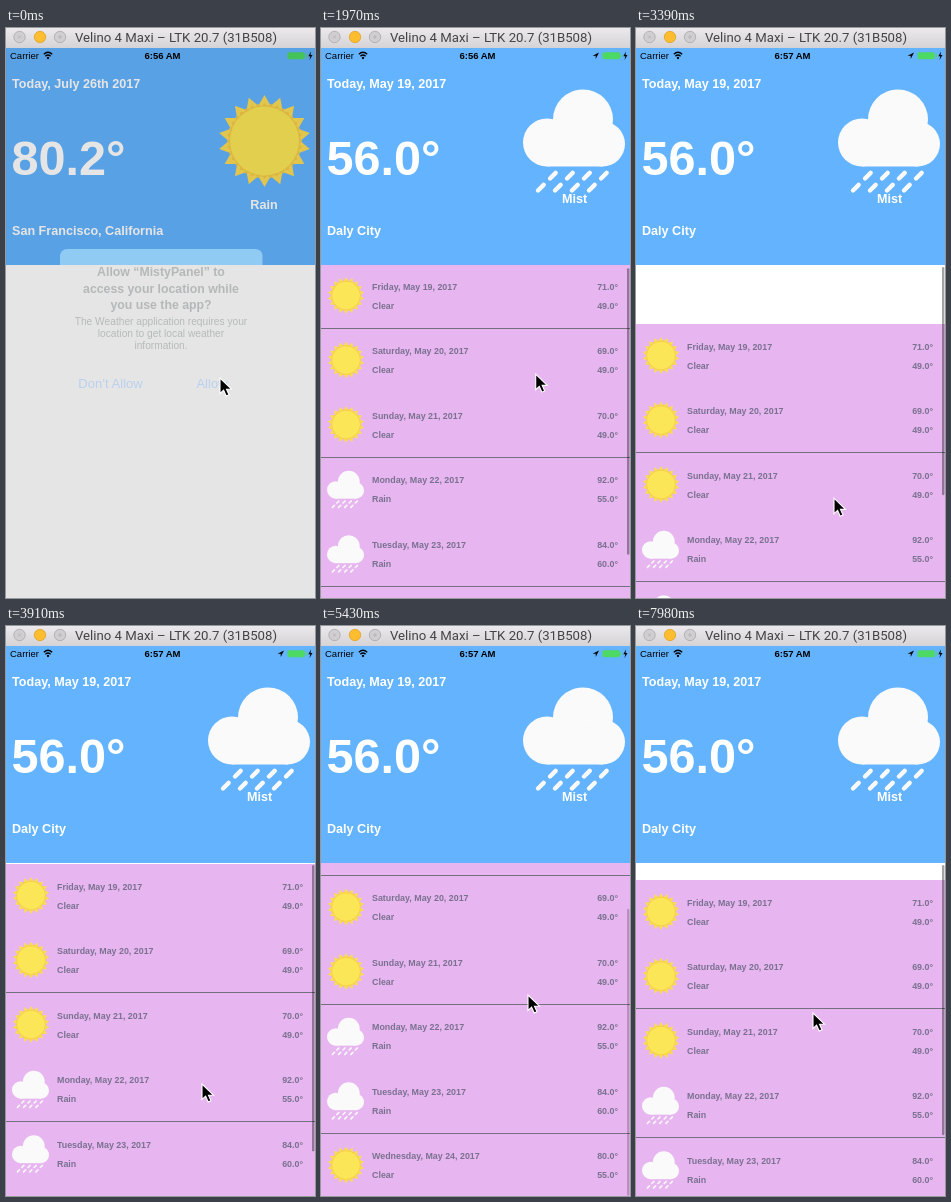
An HTML page that plays this animation: 309x570 px, repeating every 8000 ms.

```html
<!DOCTYPE html>
<html lang="en">
<head>
<meta charset="utf-8">
<title>Weather forecast</title>
<style>
  html, body { margin: 0; width: 100%; height: 100%; overflow: hidden; background: #fff; }
  svg { display: block; }
  text { font-family: "Liberation Sans", Arial, sans-serif; white-space: pre; }
  .title { font: 13.2px Roboto, sans-serif; fill: #454345; }
  .status { font-size: 9.5px; fill: #000; }
  .bold, .head, .big, .row { font-weight: bold; }
  .head { font-size: 12.6px; fill: #fff; }
  .big { font-size: 48.6px; fill: #fff; }
  .row { font-size: 8.9px; fill: #7a7190; }
  .mid { text-anchor: middle; }
  .end { text-anchor: end; }
  .ask { font-size: 12.3px; font-weight: bold; fill: #b4b8b8; }
  .info { font-size: 10.2px; fill: #b6baba; }
  .btn { font-size: 13px; fill: #b9d0ee; }
</style>
</head>
<body>
<svg id="stage" width="309" height="570" viewBox="0 0 309 570">
  <defs>
    <linearGradient id="bar" x2="0" y2="1">
      <stop offset="0" stop-color="#ebe9eb"/>
      <stop offset="1" stop-color="#d5d3d5"/>
    </linearGradient>
    <clipPath id="table"><rect y="237" width="309" height="333"/></clipPath>
    <g id="sun"></g>
    <g id="cloud" fill="#fafafa">
      <circle cx="24" cy="53" r="24"/>
      <circle cx="60" cy="30" r="30"/>
      <circle cx="79.5" cy="54.5" r="22.5"/>
      <path d="M24 40H80V77H24Z"/>
      <g id="rain" stroke="#fafafa" stroke-width="4.4" stroke-linecap="round"></g>
    </g>
  </defs>

  <rect width="309" height="570" fill="#fff"/>
  <g clip-path="url(#table)">
    <g id="rows"></g>
    <g id="lines" fill="#75707f"></g>
    <rect id="thumb" x="306" width="2.4" rx="1.2" fill="#000" fill-opacity=".36"/>
  </g>

  <rect y="20" width="309" height="217" fill="#63b3ff"/>
  <g id="before">
    <text class="head" x="6" y="60">Today, July 26th 2017</text>
    <text class="big" x="5.5" y="147">80.2°</text>
    <text class="head" x="6" y="206.5">San Francisco, California</text>
    <use href="#sun" transform="translate(258.5 113) scale(.92)"/>
    <text class="head mid" x="258" y="181">Rain</text>
  </g>
  <g id="after">
    <text class="head" x="6" y="60">Today, May 19, 2017</text>
    <text class="big" x="5.5" y="147">56.0°</text>
    <text class="head" x="6" y="206.5">Daly City</text>
    <use href="#cloud" transform="translate(202 61.5)"/>
    <text class="head mid" x="253.5" y="175">Mist</text>
    <path d="M278 24.5L271.5 27.7H274.7V31Z"/>
  </g>

  <text class="status" x="4" y="31">Carrier</text>
  <g fill="none" stroke="#000" stroke-width="1.3">
    <path d="M37.8 26.2Q42 22.4 46.2 26.2M39.4 28.2Q42 25.8 44.6 28.2"/>
    <circle cx="42" cy="30" r=".5"/>
  </g>
  <text id="clock" class="status bold mid" x="156.5" y="31"></text>
  <rect x="281.5" y="24.2" width="17.5" height="7" rx="1.6" fill="#4cd964"/>
  <rect x="300" y="26.3" width="1.2" height="3" fill="#4cd964"/>
  <path d="M305 23.5L302.3 28.3H304.3L303.5 32L306.5 27H304.5Z"/>

  <rect id="dim" y="20" width="309" height="550"/>
  <g id="alert">
    <path d="M54 237V229Q54 221 62 221H248.5Q256.5 221 256.5 229V237Z" fill="#90cbf4"/>
    <text class="ask mid" x="155" y="248">Allow “MistyPanel” to</text>
    <text class="ask mid" x="155" y="264.5">access your location while</text>
    <text class="ask mid" x="155" y="281">you use the app?</text>
    <text class="info mid" x="155" y="296.5">The Weather application requires your</text>
    <text class="info mid" x="155" y="308.5">location to get local weather</text>
    <text class="info mid" x="155" y="320.5">information.</text>
    <text class="btn mid" x="104.5" y="360">Don’t Allow</text>
    <text class="btn mid" x="206" y="360">Allow</text>
  </g>

  <rect width="309" height="20" fill="url(#bar)"/>
  <g stroke-width=".8">
    <circle cx="13.5" cy="9" r="5.7" fill="#d0ced0" stroke="#aaa8aa"/>
    <circle cx="34" cy="9" r="5.7" fill="#fdbd2f" stroke="#e0a32a"/>
    <circle cx="54" cy="9" r="5.7" fill="#d0ced0" stroke="#aaa8aa"/>
    <path d="M12 7.5l3 3m0-3l-3 3M52 9h4m-2-2v4" stroke="#b2b0b2"/>
  </g>
  <text class="title" x="69" y="14">Velino 4 Maxi – LTK 20.7 (31B508)</text>

  <path id="cursor" d="M0 0V15.5L3.6 12.2L6.2 18L9 16.8L6.5 11.2H11.5Z"
    stroke="#fff" stroke-width="1.1"/>
</svg>
<script>
const LOOP = 8000, TOP = 237, VIEW = 333, ROW = 64.5;
const END = 52.2;      // furthest resting offset of the list
const STRETCH = 0.475; // how far the list follows a drag past its ends
const SETTLE = 55;     // time constant of the bounce back, ms
const $ = id => document.getElementById(id);

const days = [
  ["Friday", "Clear", 71, 49],
  ["Saturday", "Clear", 69, 49],
  ["Sunday", "Clear", 70, 49],
  ["Monday", "Rain", 92, 55],
  ["Tuesday", "Rain", 84, 60],
  ["Wednesday", "Clear", 80, 55]
];
const LENGTH = days.length * ROW;

// the pointer eases between these stops: time, x, y
const stops = [
  [1880, 214, 350], [2677, 236.5, 225.8], [3384, 198, 470.2],
  [3740, 196, 458], [4260, 196, 458], [4720, 207, 369],
  [5640, 207, 369], [5870, 184, 174], [6180, 184, 174],
  [6400, 180, 300.5], [7270, 177, 393], [7880, 177, 393], [7981, 177, 387]
];
const drags = [
  { grab: 1900, drop: 3470, y: 347.5, base: 0 },
  { grab: 4270, drop: 4790, y: 457.3, base: 0 },
  { grab: 6400, drop: LOOP, y: 300.5, base: END }
];

const clamp = (v, lo, hi) => Math.max(lo, Math.min(hi, v));

function pointer(t) {
  const n = stops.findIndex(s => s[0] > t);
  if (n === 0) return stops[0].slice(1);
  if (n < 0) return stops[stops.length - 1].slice(1);
  const [t0, x0, y0] = stops[n - 1], [t1, x1, y1] = stops[n];
  const k = (1 - Math.cos(Math.PI * (t - t0) / (t1 - t0))) / 2;
  return [x0 + (x1 - x0) * k, y0 + (y1 - y0) * k];
}

// list offset and scroll bar opacity
function list(t) {
  const drag = drags.filter(d => d.grab <= t).pop();
  if (!drag) return [0, 0];
  const raw = drag.base + drag.y - pointer(Math.min(t, drag.drop))[1];
  const rest = clamp(raw, 0, END);
  const idle = Math.max(0, t - drag.drop), u = idle / SETTLE;
  const over = (raw - rest) * STRETCH * (1 + u) * Math.exp(-u);
  return [rest + over, clamp((705 - idle) / 135, 0, 1)];
}

function star(points, outer, inner) {
  return Array.from({ length: points * 2 }, (_, i) => {
    const r = i % 2 ? inner : outer, a = i * Math.PI / points - Math.PI / 2;
    return (r * Math.cos(a)).toFixed(2) + "," + (r * Math.sin(a)).toFixed(2);
  }).join(" ");
}

$("sun").innerHTML =
  `<polygon points="${star(18, 50, 39)}" fill="#fadb55"/>
   <polygon points="${star(36, 41, 38)}" fill="#f4cb48"/>
   <circle r="37.5" fill="#fbe657"/>`;

$("rain").innerHTML = [0, 1, 2, 3].map(i =>
  `<path d="M${15 + i * 17} 101l19 -19" fill="none" stroke-dasharray="8 9"/>`).join("");

$("rows").innerHTML =
  `<rect width="309" height="${LENGTH}" fill="#e7b6f0"/>` +
  days.map(([day, sky, high, low], i) => {
    const icon = sky === "Clear"
      ? `<use href="#sun" transform="translate(25 31.5) scale(.37)"/>`
      : `<use href="#cloud" transform="translate(6 13.2) scale(.363)"/>`;
    return `<g transform="translate(0 ${i * ROW})">${icon}
      <text class="row" x="51" y="25.7">${day}, May ${19 + i}, 2017</text>
      <text class="row" x="51" y="44.7">${sky}</text>
      <text class="row end" x="297" y="25.7">${high}.0°</text>
      <text class="row end" x="297" y="44.7">${low}.0°</text></g>`;
  }).join("");

$("lines").innerHTML = days.map(() => `<rect width="309" height="1"/>`).join("");
const lines = [...$("lines").children];

const show = (el, on) => el.setAttribute("visibility", on ? "visible" : "hidden");
const fade = (el, v) => el.setAttribute("opacity", v);

function draw(t) {
  // the screen refreshes about eleven times a second
  const q = 1970 + Math.floor((t - 1962) / 88.4) * 88.4;
  const [s, glow] = list(q), [x, y] = pointer(q);

  show($("before"), t < 450);
  show($("after"), t >= 450);
  show($("rows"), t >= 530);
  fade($("dim"), t < 90 ? .1 : t < 180 ? .035 : 0);
  fade($("alert"), t < 90 ? 1 : t < 180 ? .35 : 0);
  $("clock").textContent = t < 2330 ? "6:56 AM" : "6:57 AM";

  $("rows").setAttribute("transform", `translate(0 ${Math.ceil(TOP - s - .01)})`);
  // hairlines survive the downscaling only at some subpixel offsets
  lines.forEach((line, i) => {
    const ly = TOP + (i + 1) * ROW - s, part = ly - Math.floor(ly);
    line.setAttribute("y", Math.floor(ly));
    show(line, t >= 530 && part > .1 && part < .45);
  });

  const over = s - clamp(s, 0, END), size = VIEW * VIEW / LENGTH;
  const from = 239 + (s - over) * .84;
  $("thumb").setAttribute("y", from + Math.max(0, over));
  $("thumb").setAttribute("height", size - Math.abs(over));
  fade($("thumb"), glow);

  $("cursor").setAttribute("transform", `translate(${x} ${y})`);
}

const start = performance.now();
function tick() {
  draw((performance.now() - start) % LOOP);
  requestAnimationFrame(tick);
}
tick();
</script>
</body>
</html>
```
